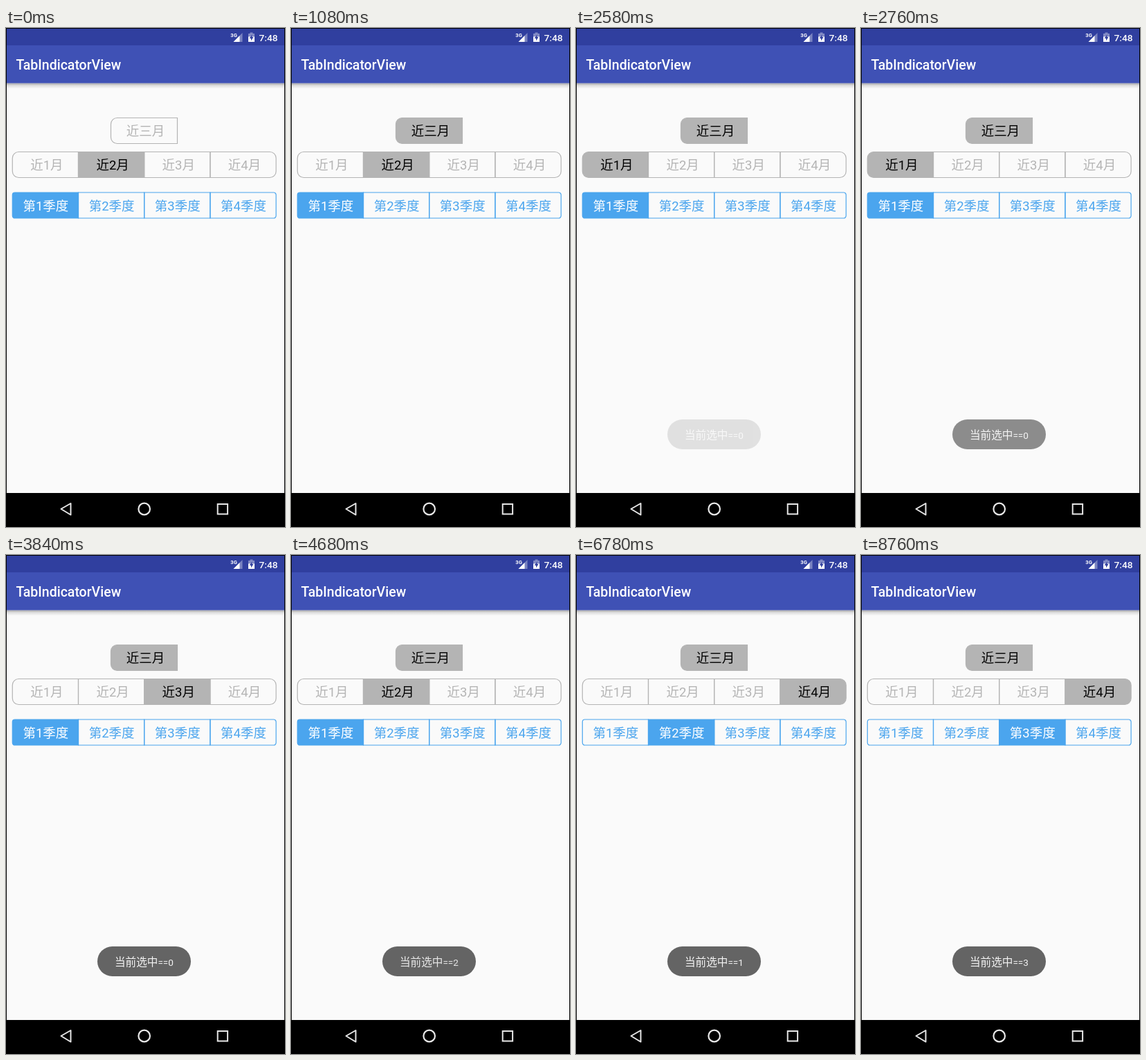
Recreate the animation shown at these times as an HTML page. Size 403 px wide and 719 px high, loop 9.84 s.

```html
<!DOCTYPE html>
<html lang="zh-CN">
<head>
<meta charset="utf-8">
<title>TabIndicatorView</title>
<style>
  html, body { margin: 0; width: 100%; height: 100%; overflow: hidden; background: #000; }
  svg { display: block; width: 403px; height: 719px; }
  text { font-family: Roboto, "Noto Sans CJK SC", "Noto Sans CJK", sans-serif; }
  .tab { font-size: 18.5px; text-anchor: middle; }
  .toast { font-size: 15.6px; fill: #f4f4f4; }
  .toast tspan { font-size: 13.6px; }
</style>
</head>
<body>
<svg id="stage" viewBox="0 0 403 719">
  <defs>
    <linearGradient id="shade" x1="0" y1="0" x2="0" y2="1">
      <stop offset="0" stop-color="#000" stop-opacity=".34"/>
      <stop offset=".4" stop-color="#000" stop-opacity=".12"/>
      <stop offset="1" stop-color="#000" stop-opacity="0"/>
    </linearGradient>
  </defs>
  <rect width="403" height="719" fill="#000"/>
  <rect x="1" y="1" width="401" height="669" fill="#fafafa"/>
  <rect x="1" y="79.5" width="401" height="8" fill="url(#shade)"/>
  <rect x="1" y="25" width="401" height="54.5" fill="#3f51b5"/>
  <rect x="1" y="1" width="401" height="24" fill="#303f9f"/>
  <text x="14.5" y="60" font-size="19.5" font-weight="500" fill="#fff">TabIndicatorView</text>

  <!-- status icons -->
  <g fill="#fff">
    <path d="M341.5 7V20H328.5Z" opacity=".35"/>
    <path d="M337.5 11V20H328.5Z"/>
    <text x="324.3" y="13" font-size="7.6" font-weight="700">3G</text>
    <path d="M350 8H352.5V6.5H356.5V8H359V13H350Z" opacity=".4"/>
    <path d="M350 12.5H359V20H350Z"/>
    <path d="M355.3 9.5L351.8 15H354V18.5L357.4 13H355.3Z" fill="#303f9f"/>
    <text x="365.5" y="18.6" font-size="13.7" font-weight="500">7:48</text>
  </g>

  <!-- navigation keys -->
  <g fill="none" stroke="#e6e6e6" stroke-width="2" stroke-linejoin="round">
    <path d="M79.5 693L93.5 685V701.5Z"/>
    <circle cx="199.7" cy="693" r="8.3" stroke-width="2.2"/>
    <rect x="305.7" y="686" width="14.4" height="14.4" stroke-linejoin="miter"/>
  </g>

  <g id="tabs"></g>

  <g id="toast">
    <rect x="132" y="564" width="135" height="43" rx="21.5" fill="#646464"/>
    <g id="lines"></g>
  </g>
</svg>
<script>
const LOOP = 9840;
const $ = id => document.getElementById(id);

function add(parent, tag, attrs, text) {
  const node = document.createElementNS("http://www.w3.org/2000/svg", tag);
  for (const key in attrs) node.setAttribute(key, attrs[key]);
  if (text !== undefined) node.textContent = text;
  parent.appendChild(node);
  return node;
}

// Cell outline with the given radius on its left and right corners.
function cell(x, y, w, h, l, r) {
  return `M${x + l} ${y}H${x + w - r}a${r} ${r} 0 0 1 ${r} ${r}V${y + h - r}` +
    `a${r} ${r} 0 0 1 ${-r} ${r}H${x + l}a${l} ${l} 0 0 1 ${-l} ${-l}V${y + l}` +
    `a${l} ${l} 0 0 1 ${l} ${-l}Z`;
}

function makeRow({ labels, x, y, w, h, left, right, shift, base, color, on }) {
  return labels.map((label, i) => {
    const l = i === 0 ? left : 0;
    const r = i === labels.length - 1 ? right : 0;
    const shape = add($("tabs"), "path", {
      d: cell(x + i * w, y, w, h, l, r), stroke: color, "stroke-width": 1.2
    });
    const text = add($("tabs"), "text", {
      class: "tab", x: x + (i + 0.5) * w + shift, y: base
    }, label);
    return active => {
      shape.setAttribute("fill", active ? color : "none");
      text.setAttribute("fill", active ? on : color);
    };
  });
}

const gray = { color: "#b4b4b4", on: "#000", h: 37, left: 9 };
const single = makeRow({ ...gray, labels: ["近三月"], x: 151.5, y: 129.5, w: 96,
  right: 0, shift: 2, base: 155 });
const months = makeRow({ ...gray, labels: [1, 2, 3, 4].map(n => `近${n}月`), x: 9.3, y: 178.5, w: 95.2,
  right: 9, shift: 2, base: 204 });
const quarters = makeRow({ labels: [1, 2, 3, 4].map(n => `第${n}季度`), x: 9.3, y: 237, w: 95.2, h: 37,
  left: 3.5, right: 3.5, shift: 0.5, base: 263, color: "#4ba5ee", on: "#fff" });

// [start time, selected indices]
const singleSteps = [[0, []], [1080, [0]]];
const monthSteps = [[0, [1]], [2460, [0, 1]], [2520, [0]], [3840, [2]], [4440, [1]], [5460, [3]]];
const quarterSteps = [[0, [0]], [6420, [1]], [8220, [2]]];

const toasts = [
  { value: 0, start: 2540, end: 3000 },
  { value: 2, start: 4440, end: 4800 },
  { value: 1, start: 6420, end: 6780 },
  { value: 3, start: 8340, end: 8700 }
];
for (const toast of toasts) {
  toast.node = add($("lines"), "text", { class: "toast", x: 157, y: 591.7 }, "当前选中");
  add(toast.node, "tspan", {}, "==" + toast.value);
}

// The screen refreshes every 60 ms, with a few longer holds.
const holds = [[2760, 2880], [2880, 3000], [8580, 8760]];
function tick(t) {
  const hold = holds.find(([a, b]) => t >= a && t < b);
  return hold ? hold[0] : Math.floor(t / 60) * 60;
}

function select(row, steps, t) {
  const active = steps.filter(s => s[0] <= t).pop()[1];
  row.forEach((paint, i) => paint(active.includes(i)));
}

const progress = (toast, t) =>
  Math.min(1, Math.max(0, (t - toast.start) / (toast.end - toast.start)));
const easeOut = p => 1 - (1 - p) ** 2;

function render(time) {
  const t = tick(time % LOOP);
  select(single, singleSteps, t);
  select(months, monthSteps, t);
  select(quarters, quarterSteps, t);

  $("toast").setAttribute("opacity", easeOut(progress(toasts[0], t)));
  toasts.forEach((toast, i) => {
    const shown = i ? easeOut(progress(toast, t)) : 1;
    const out = toasts[i + 1] ? progress(toasts[i + 1], t) : 0;
    const kept = (1 - out ** 2) * (1 - 0.85 * easeOut(out));
    toast.node.setAttribute("opacity", shown * kept);
  });
}

const begin = performance.now();
function frame() {
  render(performance.now() - begin);
  requestAnimationFrame(frame);
}
frame();
</script>
</body>
</html>
```
